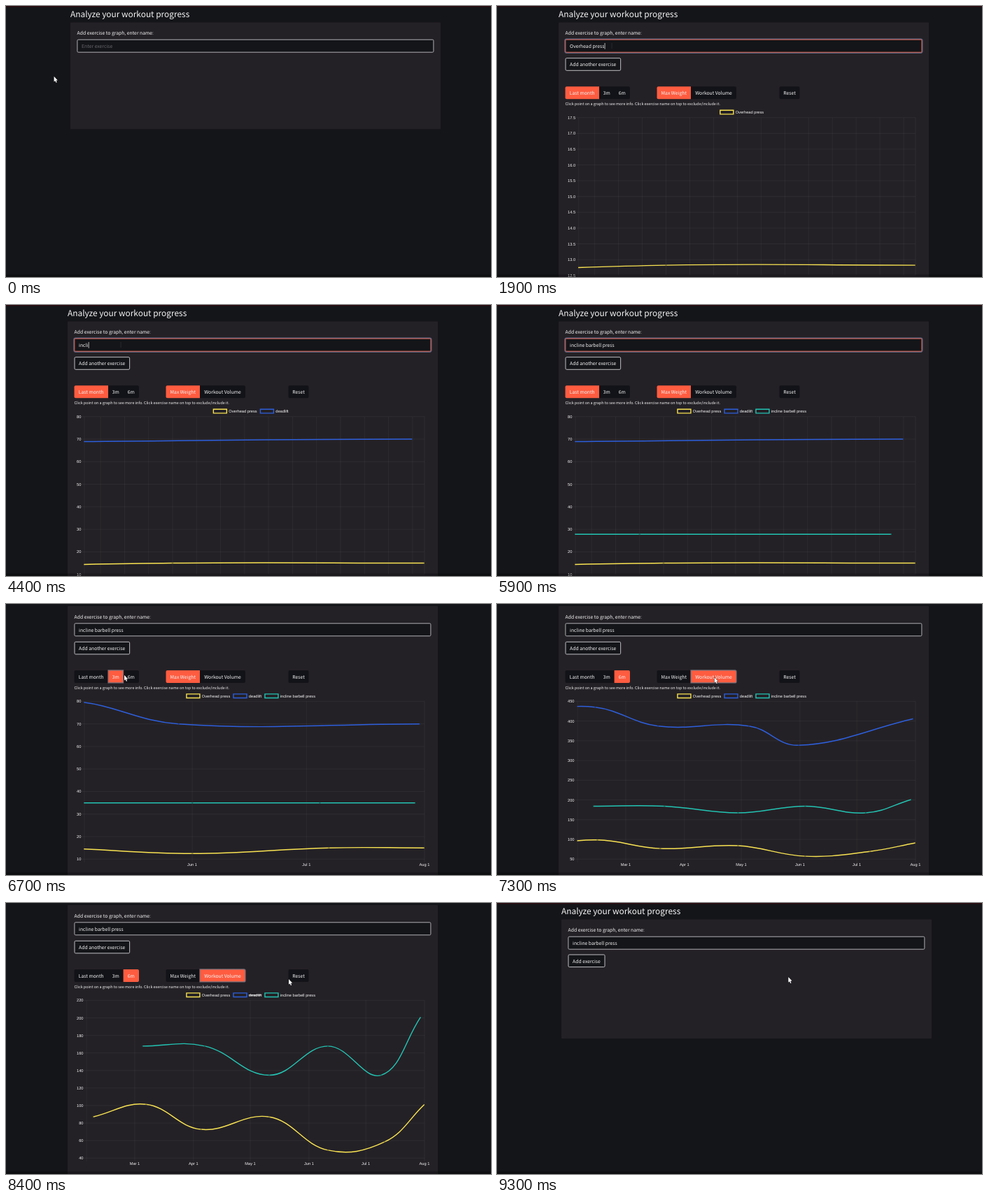
An HTML page with a canvas that plays this animation: 693 by 388 pixels, repeating every 9500 ms.

```html
<!DOCTYPE html>
<html lang="en">
<head>
<meta charset="utf-8">
<title>Workout progress</title>
<style>
  html, body { margin: 0; width: 100%; height: 100%; overflow: hidden; background: #141519; }
  canvas { display: block; width: 693px; height: 388px; }
</style>
</head>
<body>
<canvas id="stage"></canvas>
<script>
const W = 693, H = 388, LOOP = 9500;
const canvas = document.getElementById('stage');
const ratio = window.devicePixelRatio || 1;
canvas.width = W * ratio;
canvas.height = H * ratio;
const ctx = canvas.getContext('2d');

const UI = '"Noto Sans CJK SC", "Noto Sans CJK JP", "Noto Sans CJK KR", "Noto Sans CJK", "Open Sans", sans-serif';
const CHART = '"Liberation Sans", Arial, sans-serif';
const BG = '#141519', PANEL = '#242126', DARK = '#121318', ACCENT = '#ff5c40', WHITE = '#f4f4f4';

// Chart geometry, in unscrolled page pixels
const RIGHT = 598, TOP = 159.8, BOTTOM = 385.7, LABELS = 101;

// Days before 1 August, top weight and repetitions of each workout
const sets = [
  { name: 'Overhead press', color: '#f8e352',
    days: [-175, -147, -118, -82, -51, -21, 0],
    weight: [15, 17.5, 15, 15, 12.5, 15, 15], reps: [6, 6, 5, 6, 4, 4, 7] },
  { name: 'deadlift', color: '#2d5fdc',
    days: [-176, -148, -119, -77, -54, -1],
    weight: [80, 75, 80, 80, 70, 70], reps: [5, 6, 4, 4, 4, 6] },
  { name: 'incline barbell press', color: '#22c4b3',
    days: [-149, -116, -82, -51, -23, -2],
    weight: [35, 35, 35, 35, 35, 35], reps: [5, 5, 4, 5, 4, 6] }
];
const months = [['Mar 1', -153], ['Apr 1', -122], ['May 1', -92], ['Jun 1', -61], ['Jul 1', -31], ['Aug 1', 0]];
const spans = [28.35, 89.3, 178.4];

// Each view of the chart: start time, series count, span, value mode and y scale
const views = [
  { at: 1867, count: 1, span: 0, volume: 0, lo: 12.5, hi: 17.5, step: 0.5 },
  { at: 2780, count: 2, span: 0, volume: 0, lo: 10, hi: 80, step: 10 },
  { at: 5634, count: 3, span: 0, volume: 0, lo: 10, hi: 80, step: 10 },
  { at: 6250, count: 3, span: 1, volume: 0, lo: 10, hi: 80, step: 10 },
  { at: 6850, count: 3, span: 2, volume: 0, lo: 10, hi: 80, step: 10 },
  { at: 7150, count: 3, span: 2, volume: 1, lo: 50, hi: 450, step: 50 },
  { at: 7950, count: 3, span: 2, volume: 1, lo: 40, hi: 220, step: 20, hidden: 1 }
];
const RESET = 8700;

// Typing runs: start, end, first visible length, text
const typing = [
  [1000, 1700, 1, 'Overhead press'],
  [2180, 2680, 1, 'deadlift'],
  [3900, 4100, 1, 'inc'],
  [4350, 4600, 4, 'incline b'],
  [4800, 5100, 11, 'incline barbell press']
];
const FOCUS = 720, BLUR = 6250;

// Pointer: time, x, y
const path = [
  [300, 68.6, 100.8], [720, 164, 57], [5930, 164, 57], [6160, 157, 102], [6400, 157, 102],
  [6700, 169, 101.8], [6820, 178, 103], [6900, 178, 103], [7120, 309, 104], [7250, 309, 104],
  [7700, 354, 134.3], [7850, 356, 131], [8050, 356, 131], [8550, 417, 103], [8750, 417, 103],
  [9200, 415, 105.5], [9300, 416.3, 106]
];

const clamp = v => Math.max(0, Math.min(1, v));
const smooth = v => v * v * (3 - 2 * v);
const easeOut = v => 1 - (1 - clamp(v)) ** 4;
const mix = (a, b, k) => a + (b - a) * k;

function text(str, x, y, size, { color = WHITE, align = 'left', font = UI, weight = 400 } = {}) {
  ctx.font = `${weight} ${size}px ${font}`;
  ctx.fillStyle = color;
  ctx.textAlign = align;
  ctx.fillText(str, x, y);
}

function textWidth(str, size, font = UI) {
  ctx.font = `${size}px ${font}`;
  return ctx.measureText(str).width;
}

function box(x, y, w, h, r, fill, stroke, line = 1) {
  ctx.beginPath();
  ctx.roundRect(x, y, w, h, r);
  if (fill) { ctx.fillStyle = fill; ctx.fill(); }
  if (stroke) { ctx.strokeStyle = stroke; ctx.lineWidth = line; ctx.stroke(); }
}

function seg(x1, y1, x2, y2) {
  ctx.beginPath();
  ctx.moveTo(x1, y1);
  ctx.lineTo(x2, y2);
  ctx.stroke();
}

// Text in the input and the time of the last key
function typed(t) {
  let out = { value: '', key: FOCUS };
  for (const [from, to, first, str] of typing) {
    if (t < from) break;
    const n = Math.floor(mix(first, str.length, clamp((t - from) / (to - from))) + 1e-6);
    out = { value: str.slice(0, n), key: Math.min(t, to) };
  }
  return out;
}

function ticks(v) {
  const n = Math.round((v.hi - v.lo) / v.step);
  return Array.from({ length: n + 1 }, (_, i) => (v.lo + i * v.step).toFixed(v.step < 1 ? 1 : 0));
}

function leftEdge(v) {
  return LABELS + Math.max(...ticks(v).map(s => textWidth(s, 5.7, CHART))) + 4.7;
}

const xAt = (v, day) => RIGHT + day * (RIGHT - leftEdge(v)) / spans[v.span];
const yAt = (v, value) => mix(BOTTOM, TOP, (value - v.lo) / (v.hi - v.lo));

// Points glide from where the previous view left them; new ones rise from the base line
function points(k, s, t) {
  const v = views[k], set = sets[s];
  if (!v || s >= v.count) return null;
  const before = points(k - 1, s, v.at);
  const e = easeOut((t - v.at) / 1000);
  return set.days.map((d, i) => {
    const x = xAt(v, d);
    const y = yAt(v, set.weight[i] * (v.volume ? set.reps[i] : 1));
    const [px, py] = before ? before[i] : [x, BOTTOM];
    return [mix(px, x, e), mix(py, y, e)];
  });
}

// Control points of a spline with tension 0.4
function controls(pts, i) {
  const p = pts[i], a = pts[i - 1] || p, b = pts[i + 1] || p;
  const da = Math.hypot(p[0] - a[0], p[1] - a[1]);
  const db = Math.hypot(b[0] - p[0], b[1] - p[1]);
  const fa = 0.4 * da / (da + db), fb = 0.4 * db / (da + db);
  const dx = b[0] - a[0], dy = b[1] - a[1];
  const cap = y => Math.max(TOP, Math.min(BOTTOM, y));
  return [p[0] - fa * dx, cap(p[1] - fa * dy), p[0] + fb * dx, cap(p[1] + fb * dy)];
}

function drawSeries(pts, color, left) {
  ctx.save();
  ctx.beginPath();
  ctx.rect(left - 0.7, TOP - 0.8, RIGHT - left + 1.4, BOTTOM - TOP + 1.6);
  ctx.clip();
  ctx.beginPath();
  pts.forEach(([x, y], i) => {
    if (!i) return ctx.moveTo(x, y);
    const a = controls(pts, i - 1), b = controls(pts, i);
    ctx.bezierCurveTo(a[2], a[3], b[0], b[1], x, y);
  });
  ctx.strokeStyle = color;
  ctx.lineWidth = 1.45;
  ctx.stroke();
  ctx.restore();
  ctx.lineWidth = 0.6;
  for (const [x, y] of pts) {
    if (x < left - 0.5 || x > RIGHT + 0.5) continue;
    ctx.beginPath();
    ctx.arc(x, y, 1.45, 0, 7);
    ctx.fillStyle = 'rgba(0,0,0,.25)';
    ctx.fill();
    ctx.stroke();
  }
}

function drawLegend(v) {
  const shown = sets.slice(0, v.count);
  const widths = shown.map(s => 21.85 + textWidth(s.name, 5.7, CHART));
  let x = 350 - (widths.reduce((a, b) => a + b) + 4.75 * (shown.length - 1)) / 2;
  shown.forEach((s, i) => {
    box(x, 149.3, 19, 5.6, 0, null, s.color, 1.4);
    text(s.name, x + 21.85, 154.1, 5.7, { font: CHART });
    if (v.hidden === i) {
      ctx.strokeStyle = WHITE;
      ctx.lineWidth = 0.9;
      seg(x + 21.85, 152.2, x + widths[i], 152.2);
    }
    x += widths[i] + 4.75;
  });
}

function drawChart(k, t) {
  const v = views[k], left = leftEdge(v);
  drawLegend(v);
  ctx.strokeStyle = 'rgba(255,255,255,.07)';
  ctx.lineWidth = 0.7;
  for (const s of ticks(v)) {
    const y = yAt(v, +s);
    seg(left - 4.7, y, RIGHT, y);
    text(s, left - 4.7, y + 2, 5.7, { font: CHART, align: 'right' });
  }
  seg(left, TOP, left, BOTTOM + 4.7);
  if (v.span === 0) {
    for (let d = -1; d > -spans[0]; d -= 2) seg(xAt(v, d), TOP, xAt(v, d), BOTTOM);
    seg(RIGHT, TOP, RIGHT, BOTTOM);
  } else {
    for (const [name, d] of months) {
      if (d < -spans[v.span]) continue;
      const x = xAt(v, d);
      seg(x, TOP, x, BOTTOM + 4.7);
      text(name, x, BOTTOM + 9.9, 5.7, { font: CHART, align: 'center' });
    }
  }
  for (let s = v.count - 1; s >= 0; s--) {
    if (v.hidden !== s) drawSeries(points(k, s, t), sets[s].color, left);
  }
}

function drawGroup(edges, labels, active, ring) {
  const last = edges.length - 1;
  box(edges[0], 115.3, edges[last] - edges[0], 18, 2, DARK);
  labels.forEach((label, i) => {
    const x = edges[i], w = edges[i + 1] - x;
    if (i === active) {
      const r = [i ? 0 : 2, i === last - 1 ? 2 : 0];
      box(x, 115.3, w, 18, [r[0], r[1], r[1], r[0]], ACCENT, ring && '#77707a', 1.2);
    }
    text(label, x + w / 2, 127.4, 6.8, { align: 'center' });
  });
}

function drawForm(t, left, charted) {
  const { value, key } = typed(t);
  const focused = t >= FOCUS && t < BLUR;
  const x = left + 9.6;
  text('Add exercise to graph, enter name:', x, 41.1, 6.8);
  if (focused) box(x - 0.2, 47.7, 510, 19.1, 2, null, '#5f6480', 2.2);
  box(x + 0.3, 48.2, 509, 18, 1.5, BG, focused ? '#e4604c' : '#b9b9bc', 0.95);
  if (value) text(value, x + 6.5, 60, 6.8);
  else text('Enter exercise', x + 6.5, 60, 6.8, { color: '#68686d' });
  if (focused && (t - key) % 1060 < 530) {
    ctx.fillStyle = WHITE;
    ctx.fillRect(x + 6.9 + textWidth(value, 6.8), 53, 0.7, 8.8);
  }
  if (value || charted) {
    const label = charted ? 'Add another exercise' : 'Add exercise';
    box(x + 0.4, charted ? 74.7 : 74, textWidth(label, 6.8) + 12.4, 17.6, 1.5, BG, '#c9c9cc', 0.95);
    text(label, x + 6.5, charted ? 86.3 : 85.6, 6.8);
  }
}

function drawPointer(t) {
  let [, x, y] = path[0];
  for (let i = 1; i < path.length && t > path[i - 1][0]; i++) {
    const [t0, x0, y0] = path[i - 1], [t1, x1, y1] = path[i];
    const k = smooth(clamp((t - t0) / (t1 - t0)));
    x = mix(x0, x1, k);
    y = mix(y0, y1, k);
  }
  if (t > 640 && t < 5990) {
    ctx.fillStyle = 'rgba(70,70,78,.6)';
    ctx.fillRect(x - 0.3, y - 4, 0.7, 8);
    return;
  }
  const shape = [0, 0, 0, 7.8, 1.7, 6.2, 2.9, 9, 4.2, 8.4, 3, 5.7, 5.3, 5.6];
  ctx.beginPath();
  for (let i = 0; i < shape.length; i += 2) ctx.lineTo(x + shape[i], y + shape[i + 1]);
  ctx.closePath();
  ctx.strokeStyle = '#0a0a0c';
  ctx.lineWidth = 0.9;
  ctx.stroke();
  ctx.fillStyle = '#fff';
  ctx.fill();
}

function draw(t) {
  ctx.setTransform(ratio, 0, 0, ratio, 0, 0);
  ctx.textRendering = 'geometricPrecision';
  ctx.fillStyle = BG;
  ctx.fillRect(0, 0, W, H);

  const k = t < RESET ? views.findLastIndex(v => t >= v.at) : -1;
  const charted = k >= 0;
  const left = charted ? 88 : 92;
  const scroll = charted ? 20.4 * smooth(clamp((t - 6030) / 130)) : 0;

  ctx.save();
  ctx.translate(0, -scroll);
  ctx.fillStyle = '#2b0b10';
  ctx.fillRect(0, 0, W, 1.4);
  text('Analyze your workout progress', left, 16.1, 11.9);
  const bottom = charted ? 420 : typed(t).value ? 194 : 176.3;
  box(left, 23.4, 529, bottom - 23.4, 1, PANEL);
  drawForm(t, left, charted);
  if (charted) {
    const v = views[k];
    drawGroup([97.5, 146, 167.6, 190], ['Last month', '3m', '6m'], v.span, v.span && !v.volume);
    drawGroup([228.5, 277, 342], ['Max Weight', 'Workout Volume'], v.volume, v.volume);
    drawGroup([403.5, 432.5], ['Reset'], -1);
    text('Click point on a graph to see more info. Click exercise name on top to exclude/include it.', 97.4, 142.2, 5.45);
    drawChart(k, t);
  }
  ctx.restore();

  ctx.fillStyle = 'rgba(0,0,0,.3)';
  ctx.fillRect(0, 384.5, W, 3.5);
  drawPointer(t);
}

const start = performance.now();
function frame() {
  draw((performance.now() - start) % LOOP);
  requestAnimationFrame(frame);
}
frame();
</script>
</body>
</html>
```
